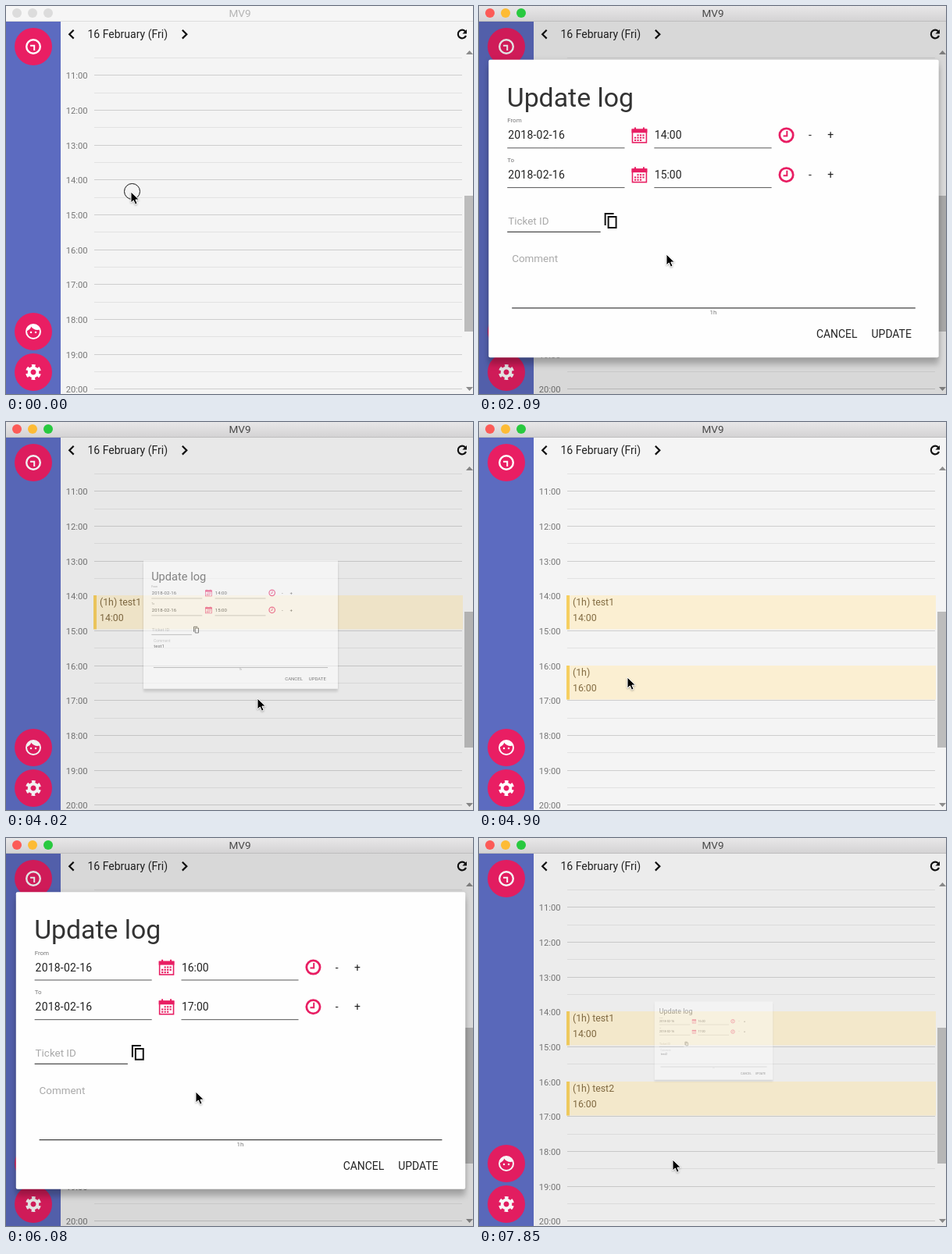
Animation, 598 px wide and 497 px high, one loop 8 s. Source, as an HTML page:

```html
<!DOCTYPE html>
<html lang="en">
<head>
<meta charset="utf-8">
<title>Work log</title>
<style>
  html, body { margin: 0; width: 100%; height: 100%; overflow: hidden; background: #f4f4f4; }
  svg { display: block; }
  text { font-family: Roboto, "Open Sans", sans-serif; font-size: 14px; fill: #222; white-space: pre; }
  .hour { font-size: 11.2px; fill: #777; text-anchor: end; }
  .tiny { font-size: 8px; fill: #777; }
  .hint { font-size: 13.5px; fill: #aaa; }
  .event text { font-size: 12.3px; fill: #836c42; }
  .event.picked text { fill: #fff; }
  .date { letter-spacing: .25px; }
  .pen { fill: none; stroke: #111; stroke-width: 2.2; }
  .white { fill: none; stroke: #fff; stroke-width: 2; }
  .pink { fill: none; stroke: #e91e63; }
  #paper { filter: drop-shadow(0 9px 4px rgba(0,0,0,.2)) drop-shadow(0 1px 3px rgba(0,0,0,.14)); }
  #cursor { filter: drop-shadow(0 1px 1px rgba(0,0,0,.3)); }
</style>
</head>
<body>
<svg id="stage" width="598" height="497" viewBox="0 0 598 497">
  <defs>
    <linearGradient id="bar" x2="0" y2="1">
      <stop offset="0" stop-color="#e8e7e8"/><stop offset="1" stop-color="#d3d2d3"/>
    </linearGradient>
    <g id="calendar">
      <rect x="1" y="3" width="18" height="16.5" class="pink" stroke-width="1.6"/>
      <path d="M0 2h20v5H0z" fill="#e91e63"/>
      <path d="M4.5 0v3M15.5 0v3" class="pink" stroke-width="2"/>
      <path d="M7 10h10M3.5 13.3h13.5M3.5 16.6h10" class="pink" stroke-width="2.1" stroke-dasharray="2.2 1.3"/>
    </g>
    <g id="clock" class="pink">
      <circle r="8.7" stroke-width="2.8"/>
      <path d="M.8-5.5V1H-4" stroke-width="2"/>
    </g>
  </defs>

  <rect width="598" height="497" fill="#f4f4f4"/>
  <g id="grid"></g>
  <g id="events"></g>

  <path d="M86.7 30.8l-5.5 5.4 5.5 5.4M225.8 30.8l5.5 5.4-5.5 5.4" class="pen"/>
  <text x="104.5" y="41">16 February (Fri)</text>
  <path d="M588 32.4A5.3 5.3 0 1 0 589 38" class="pen" stroke-width="1.8"/>
  <path d="M590 30v5.6h-5.6z" fill="#111"/>

  <path d="M589 62l4.5-5 4.5 5zM589 488l4.5 5 4.5-5z" fill="#8c8c8c"/>
  <rect x="587" y="243" width="11" height="174" fill="#bcbcbc"/>

  <rect y="20" width="70" height="477" fill="#5c6bc0"/>
  <g fill="#e91e63">
    <circle cx="35" cy="52" r="24"/>
    <circle cx="35" cy="417" r="24"/>
    <circle cx="35" cy="469" r="24"/>
  </g>
  <circle id="ring" cx="35" cy="52" r="25" fill="#b84282" stroke="#4183c9" stroke-width="2.6"/>
  <g class="white" transform="translate(35 52)">
    <circle r="8.8" stroke-width="2.4"/>
    <path d="M-4-1.3H1.2V5"/>
  </g>
  <g transform="translate(23 405)">
    <circle cx="12" cy="12" r="9" class="white"/>
    <path d="M3 11.6C6 10.5 8.3 8.5 9.3 5.8 11 8.3 14 10 17.4 10q1.6 0 3-.4A9 9 0 0 0 3 11.6z" fill="#fff"/>
    <circle cx="9" cy="13" r="1.25" fill="#fff"/>
    <circle cx="15" cy="13" r="1.25" fill="#fff"/>
  </g>
  <g class="white" transform="translate(35 469)">
    <circle r="5.4" stroke-width="3.8"/>
    <circle r="8" stroke-width="4" stroke-dasharray="4.4 3.98" stroke-dashoffset="-1.99"/>
  </g>

  <rect id="shade" y="20" width="598" height="477"/>

  <rect id="titlebar" width="598" height="20"/>
  <path d="M0 19.5h598" stroke="#000" stroke-opacity=".1"/>
  <circle class="light" cx="14" cy="9" r="6"/>
  <circle class="light" cx="34" cy="9" r="6"/>
  <circle class="light" cx="54" cy="9" r="6"/>
  <text id="name" x="299.5" y="14" text-anchor="middle" style="font-size:13.5px">MV9</text>

  <g id="dialog">
    <rect id="paper" x="11" y="68" width="579" height="383" rx="2" fill="#fff"/>
    <text x="34.5" y="128.5" style="font-size:34px;fill:#333">Update log</text>
    <g id="rows"></g>
    <text class="hint" x="36" y="280">Ticket ID</text>
    <path d="M35 289.5h120" stroke="#222"/>
    <path d="M161 281v-15h11M165 270h10v14h-10z" class="pen" style="stroke-width:2"/>
    <text id="label" x="41">Comment</text>
    <text id="typed" x="42" y="329"></text>
    <path id="caret" d="M0 316.500v17" stroke="#222"/>
    <path id="line" d="M41 387.500h519"/>
    <text class="tiny" x="300" y="396" text-anchor="middle">1h</text>
    <text x="432.500" y="426">CANCEL</text>
    <text x="503.500" y="426">UPDATE</text>
  </g>

  <circle id="tap" cx="161.500" cy="237.500" r="10" fill="none" stroke="#111"/>
  <path id="cursor" d="M0 0v14l3.300-3 2.200 5.200 2.600-1.100-2.200-5h4.500z" fill="#000" stroke="#fff"/>
</svg>

<script>
const LOOP = 8000;
const OPEN_TIME = 400;
const KEY_TIME = 140;
const $ = id => document.getElementById(id);

const logs = [
  { hour: 14, y: 222, born: 900, pick: 1640, open: 1760, focus: 2380, blur: 3720, close: 3946, word: 'test1' },
  { hour: 16, y: 312, born: 4900, pick: 5640, open: 5760, focus: 6220, blur: 7400, close: 7743, word: 'test2' }
];

// Pointer stops: time, x, y
const path = [
  [0, 160, 238], [150, 148, 240], [900, 148, 240], [1350, 214, 240], [1640, 226, 244],
  [1790, 229, 262], [2090, 240, 318], [3280, 240, 318], [3720, 528, 421], [4020, 322, 354],
  [4160, 245, 336], [4310, 224, 328], [4600, 190, 327], [5050, 190, 327], [5490, 247, 350],
  [5790, 249, 354], [6080, 243, 325], [6820, 243, 325], [7110, 417, 404], [7400, 525, 421],
  [7550, 515, 421], [7850, 248, 412]
];

const shortHolds = [9, 16, 23, 27, 30, 35, 39, 43, 47, 48];

function hold(t) {
  let start = 0;
  for (let i = 0; ; i++) {
    const end = start + (shortHolds.includes(i) ? 140 : 150);
    if (t < end || end >= LOOP) return start;
    start = end;
  }
}

const clamp = v => Math.min(1, Math.max(0, v));

// cubic-bezier(.25, .8, .25, 1)
function ease(x) {
  if (x <= 0) return 0;
  if (x >= 1) return 1;
  const curve = (s, a, b) => 3 * (1 - s) ** 2 * s * a + 3 * (1 - s) * s * s * b + s ** 3;
  let lo = 0, hi = 1;
  for (let i = 0; i < 20; i++) {
    const mid = (lo + hi) / 2;
    if (curve(mid, .25, .25) < x) lo = mid; else hi = mid;
  }
  return curve(lo, .8, 1);
}

function pointer(t) {
  const i = path.findIndex(p => p[0] > t);
  if (i < 0) return path[path.length - 1].slice(1);
  const [t0, x0, y0] = path[i - 1], [t1, x1, y1] = path[i];
  const k = (t - t0) / (t1 - t0);
  return [x0 + (x1 - x0) * k, y0 + (y1 - y0) * k];
}

function build() {
  let grid = '';
  for (let i = 0; i < 10; i++) {
    const half = Math.round(66 + 44.65 * i) + .5;
    const full = Math.round(88.3 + 44.65 * i) + .5;
    grid += `<path d="M113 ${half}h471" stroke="#e2e2e2"/><path d="M113 ${full}h471" stroke="#cecece"/>
      <text class="hour" x="104.500" y="${full + 4}">${11 + i}:00</text>`;
  }
  $('grid').innerHTML = grid;

  $('events').innerHTML = logs.map(l => `<g class="event" transform="translate(112 ${l.y})">
    <rect width="473" height="43.500"/><rect width="4" height="43.500" fill="#f6cf60"/>
    <text y="12.500"></text><text y="32.500">${l.hour}:00</text></g>`).join('');

  $('rows').innerHTML = ['From', 'To'].map((name, i) => `<g transform="translate(0 ${51 * i})">
    <text class="tiny" x="35" y="149">${name}</text>
    <text class="date" x="36" y="170">2018-02-16</text>
    <text class="time" x="224.500" y="170"></text>
    <path d="M35 181.500h151M224 181.500h151" stroke="#555"/>
    <use href="#calendar" x="195" y="155"/><use href="#clock" x="394" y="165"/>
    <text x="422.500" y="170">-</text><text x="447" y="170">+</text></g>`).join('');
}

function drawWindow(t) {
  const active = t >= 750;
  $('titlebar').setAttribute('fill', active ? 'url(#bar)' : '#f6f6f6');
  $('name').style.fill = active ? '#484848' : '#b4b4b4';
  const colours = ['#fc5b57', '#fdbb35', '#28c93f'];
  document.querySelectorAll('.light').forEach((el, i) =>
    el.setAttribute('fill', active ? colours[i] : '#dcdcdc'));
  $('ring').setAttribute('opacity', clamp((t - 750) / 400) * clamp((2040 - t) / 280));
}

function drawEvents(t) {
  logs.forEach((l, i) => {
    const el = $('events').children[i];
    const [box, edge, top, bottom] = el.children;
    const picked = t >= l.pick && t < l.close;
    el.setAttribute('visibility', t >= l.born ? 'visible' : 'hidden');
    el.classList.toggle('picked', picked);
    box.setAttribute('fill', picked ? '#f8d66a' : '#fbefd2');
    edge.setAttribute('opacity', picked ? 0 : 1);
    top.textContent = '(1h)' + (t >= l.close ? ' ' + l.word : '');
    for (const line of [top, bottom]) line.setAttribute('x', picked ? 4 : 8);
  });
}

function drawDialog(t) {
  const log = t < logs[1].open ? logs[0] : logs[1];
  const p = t < log.close ? ease((t - log.open) / OPEN_TIME) : 1 - ease((t - log.close) / OPEN_TIME);
  $('shade').setAttribute('opacity', .115 * p);
  $('dialog').setAttribute('visibility', p > .01 ? 'visible' : 'hidden');
  $('dialog').setAttribute('opacity', p ** .7);
  $('dialog').setAttribute('transform', `translate(300.5 259.5) scale(${p}) translate(-300.5 -259.5)`);

  document.querySelectorAll('.time').forEach((el, i) => el.textContent = `${log.hour + i}:00`);

  const focused = t >= log.focus && t < log.blur;
  const floating = t >= log.focus;
  const count = Math.max(0, Math.floor((t - log.focus) / KEY_TIME));
  const typed = $('typed');
  typed.textContent = log.word.slice(0, count);
  const end = 42 + (count ? typed.getComputedTextLength() : 0);
  $('caret').setAttribute('transform', `translate(${Math.floor(end) + .5} 0)`);
  $('caret').setAttribute('opacity', focused ? 1 : 0);

  const label = $('label');
  label.setAttribute('y', floating ? 311 : 328);
  label.style.fontSize = floating ? '11.5px' : '13.5px';
  label.style.fill = focused ? '#e91e63' : '#aaa';
  $('line').setAttribute('stroke', focused ? '#e91e63' : '#111');
  $('line').setAttribute('stroke-width', focused ? 2 : 1);
}

function draw(t) {
  drawWindow(t);
  drawEvents(t);
  drawDialog(t);
  $('tap').setAttribute('visibility', t < 150 ? 'visible' : 'hidden');
  $('cursor').setAttribute('transform', `translate(${pointer(t)})`);
}

build();
draw(0);
const begin = performance.now();
let shown = 0;
requestAnimationFrame(function tick() {
  const t = hold((performance.now() - begin) % LOOP);
  if (t !== shown) draw(shown = t);
  requestAnimationFrame(tick);
});
</script>
</body>
</html>
```
